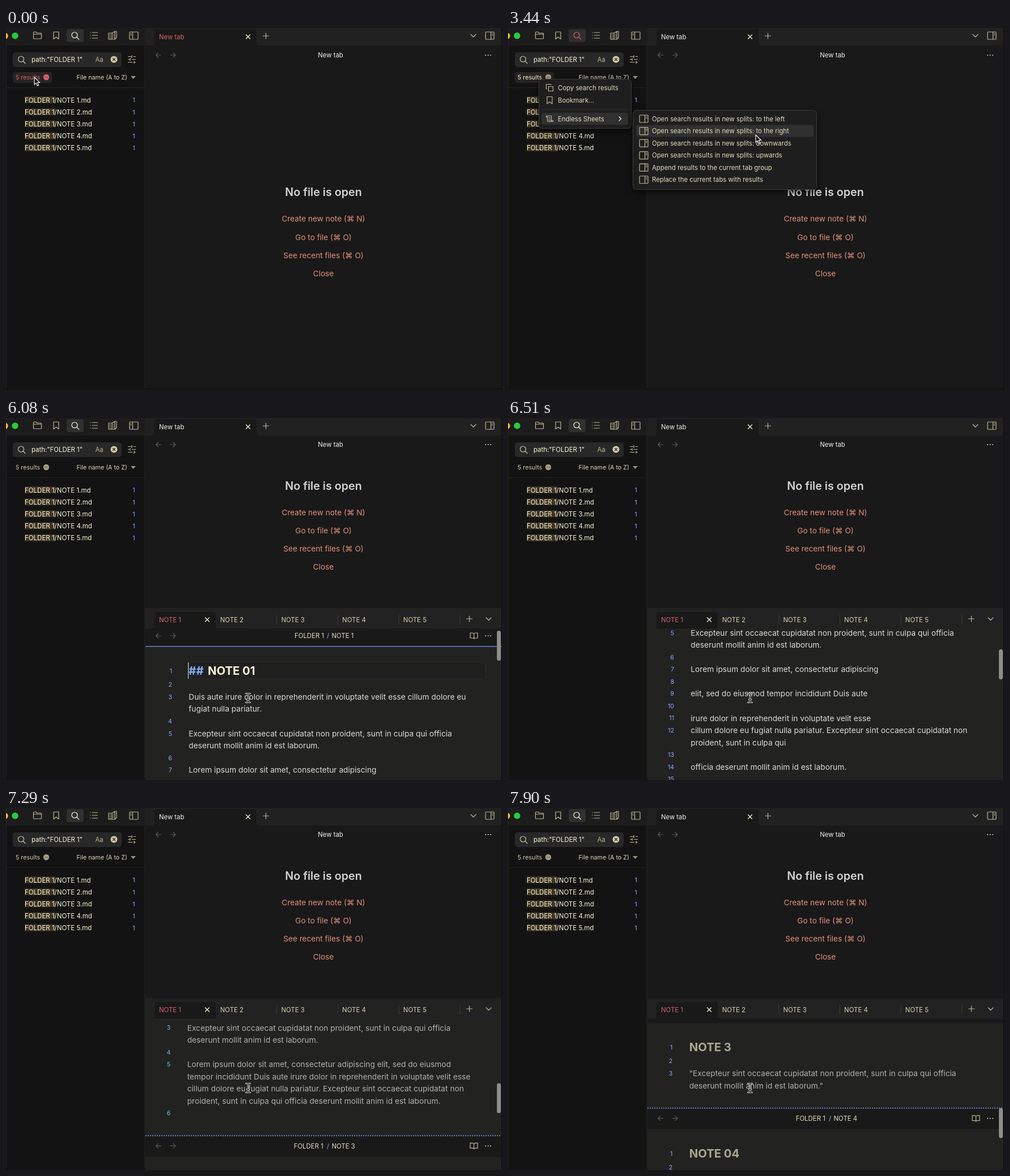
Animation, 875 px wide and 640 px high, one loop 7.99 s. Source, as an HTML page:

```html
<!DOCTYPE html>
<html lang="en">
<head>
<meta charset="utf-8">
<title>Search results in split notes</title>
<style>
  html, body { margin: 0; width: 100%; height: 100%; overflow: hidden; background: #191919; }
  svg { display: block; width: 875px; height: 640px; font-family: Inter, "Noto Sans", sans-serif; }
  text { white-space: pre; }
  .pop { filter: drop-shadow(0 4px 6px #0009); }
</style>
</head>
<body>
<svg id="stage" viewBox="0 0 875 640"></svg>
<script>
const TAN = '#bfb692', CREAM = '#fbf6d4', WHITE = '#f0f0ec', RED = '#d4606d',
      BLUE = '#86adff', LINK = '#e29078', FAINT = '#5d5a4e';
const LOOP = 7990, STEP = 86.7, ROW = 21.55;

// ---- drawing helpers: everything returns markup ----
const text = (x, cy, s, size, fill, more = '') =>
  `<text x="${x}" y="${cy + size * .36}" font-size="${size}" fill="${fill}" ${more}>${s}</text>`;
const mid = (x, cy, s, size, fill, more = '') => text(x, cy, s, size, fill, 'text-anchor="middle" ' + more);
const rect = (x, y, w, h, fill, r = 0, more = '') =>
  `<rect x="${x}" y="${y}" width="${w}" height="${h}" rx="${r}" fill="${fill}" ${more}/>`;
const icon = (x, y, d, color = TAN, more = '') =>
  `<path transform="translate(${x} ${y})" d="${d}" fill="none" stroke="${color}" stroke-width="1.2" stroke-linecap="round" stroke-linejoin="round" ${more}/>`;
const group = (id, body, more = '') => `<g id="${id}" ${more}>${body}</g>`;

const D = {
  folder: 'M-7 5V-5q0-1 1-1h3.5l2 2H6q1 0 1 1V5q0 1-1 1H-6q-1 0-1-1zM-7-2H7',
  bookmark: 'M-4.500-6H4.500V6.500L0 3-4.500 6.500z',
  search: 'M4-1A5 5 0 1 1-6-1A5 5 0 1 1 4-1M2.600 2.600L6.500 6.500',
  list: 'M-6.500-5h.5M-6.500 0h.5M-6.500 5h.5M-3-5H6.500M-3 0H6.500M-3 5H6.500',
  pages: 'M-7-4H-1V7H-7zM-1-4L4-7H7V4L4 7H-1M4-7V7M-5-1h2M-5 2h2M-5 5h2M1-2h1M1 1h1M1 4h1',
  panel: 'M-7.500-5.500q0-1 1-1h13q1 0 1 1v11q0 1-1 1h-13q-1 0-1-1zM-2-6.500v13M-5.500-3.500h1.500M-5.500-1h1.500',
  right: 'M-7.500-5.500q0-1 1-1h13q1 0 1 1v11q0 1-1 1h-13q-1 0-1-1zM2-6.500v13M4-3.500h1.500M4-1h1.500',
  sliders: 'M-6.500-5H0M3-5H6.500M0-7v4M-6.500 0H-3M0 0H6.500M-3-2v4M-6.500 5H1M4 5H6.500M4 3v4',
  cross: 'M-3.500-3.500L3.500 3.500M3.500-3.500L-3.500 3.500',
  plus: 'M-5 0H5M0-5V5',
  down: 'M-4.500-2L0 2.500 4.500-2',
  next: 'M-2-3.500L1.500 0-2 3.500',
  back: 'M4.500 0H-4.500M-.5-4L-4.500 0-.5 4',
  fwd: 'M-4.500 0H4.500M.5-4L4.500 0 .5 4',
  dots: 'M-4.500 0h.2M0 0h.2M4.500 0h.2',
  book: 'M0-3.500Q-1-5-3-5H-6.500V4H-2Q-.5 4 0 5.500Q.5 4 2 4H6.500V-5H3Q1-5 0-3.500V5',
  copy: 'M-2-2H6V6H-2zM-5 2H-6V-6H2V-5',
  scroll: 'M-4 3V-5H3V5M-6-3V-5H-4M-6-3H-4M-2 3H6V5H-3Q-4 5-4 3M-1.500-2H1M-1.500 .5H1'
};
const dots = (x, y) => icon(x, y, D.dots, TAN, 'style="stroke-width:2"');
const arrows = y => icon(269, y, D.back, FAINT) + icon(294.5, y, D.fwd, FAINT);

// ---- sidebar and window chrome ----
function sidebar() {
  let s = rect(0, 0, 245, 640, '#131313') + rect(0, 0, 875, 31, '#212121') + rect(0, 0, 245, 31, '#1c1c1c') +
    rect(244, 0, 2, 640, '#1e1e1e') + rect(0, 0, 1, 640, '#242424') +
    rect(0, 636, 875, 4, '#131313') +
    '<circle cx="-2" cy="14" r="5.7" fill="#f5bd30"/><circle cx="16" cy="13.700" r="5.700" fill="#2bc840"/>' +
    rect(107, 2, 30, 23, '#303030', 4) +
    icon(55.5, 13, D.folder) + icon(88.5, 13, D.bookmark) + icon(122, 13.5, D.search, CREAM, 'id="find"') +
    icon(155, 13, D.list) + icon(188, 13, D.pages) + icon(225.5, 13.5, D.panel) +
    rect(12, 43, 192, 26, '#282828', 5) + icon(27.5, 56, D.search, '#cfc8a8') +
    text(45, 56, 'path:"FOLDER 1"', 11.4, CREAM) + text(157.5, 56, 'Aa', 11.4, TAN) +
    '<circle cx="190.500" cy="55.500" r="6" fill="#d2c9a6"/>' +
    icon(190.5, 55.5, 'M-2-2L2 2M2-2L-2 2', '#282828') + icon(222, 55.5, D.sliders) +
    rect(12, 78, 69, 19, '#292424', 4, 'id="chip"') +
    text(17, 87.5, '5 results', 10.7, RED, 'id="count"') +
    '<circle id="badge" cx="71" cy="87" r="5.200"/>' + icon(71, 87, 'M-2.500 0h.1M0 0h.1M2.500 0h.1', '#222') +
    text(124.5, 87.5, 'File name (A to Z)', 10.7, '#e0d8b6') +
    '<path d="M220 85h9l-4.500 5z" fill="#99927a"/>' + rect(0, 105, 244, 1, '#242424');
  for (let i = 1; i <= 5; i++) {
    const y = 127 + (i - 1) * 21.2;
    s += rect(33, y - 6, 54, 12, '#3f3525') + text(33, y + .5, `FOLDER 1/NOTE ${i}.md`, 11.5, CREAM) +
      mid(225.5, y + .5, 1, 11, BLUE);
  }
  return s;
}

function topPane() {
  const lines = ['Create new note (⌘ N)', 'Go to file (⌘ O)', 'See recent files (⌘ O)', 'Close'];
  return '<path d="M258 31q4 0 4-4V6q0-4 4-4H438q4 0 4 4V27q0 4 4 4z" fill="#191919"/>' +
    text(270, 15.5, 'New tab', 11.3, RED, 'id="tabName"') + icon(427, 15.5, D.cross, CREAM) +
    icon(458.5, 14, D.plus) + icon(824.5, 13.5, D.down) + icon(853.5, 13.5, D.right) +
    group('paneHead', arrows(48) + mid(572.5, 48, 'New tab', 11.3, WHITE) + dots(850.5, 48)) +
    group('empty', mid(560, 290.3, 'No file is open', 19.7, '#d4d4d2', 'font-weight="600"') +
      lines.map((l, i) => mid(560, 337.5 + i * 32.2, l, 13.6, LINK)).join(''));
}

// ---- notes in the lower pane ----
const NOTES = [
  ['NOTE 01', [
    ['Duis aute irure dolor in reprehenderit in voluptate velit esse cillum dolore eu', 'fugiat nulla pariatur.'], [''],
    ['Excepteur sint occaecat cupidatat non proident, sunt in culpa qui officia', 'deserunt mollit anim id est laborum.'], [''],
    ['Lorem ipsum dolor sit amet, consectetur adipiscing'], [''],
    ['elit, sed do eiusmod tempor incididunt Duis aute'], [''],
    ['irure dolor in reprehenderit in voluptate velit esse'],
    ['cillum dolore eu fugiat nulla pariatur. Excepteur sint occaecat cupidatat non', 'proident, sunt in culpa qui'], [''],
    ['officia deserunt mollit anim id est laborum.'], ['']]],
  ['NOTE 2', [
    ['Excepteur sint occaecat cupidatat non proident, sunt in culpa qui officia', 'deserunt mollit anim id est laborum.'], [''],
    ['Lorem ipsum dolor sit amet, consectetur adipiscing elit, sed do eiusmod',
     'tempor incididunt Duis aute irure dolor in reprehenderit in voluptate velit esse',
     'cillum dolore eu fugiat nulla pariatur. Excepteur sint occaecat cupidatat non',
     'proident, sunt in culpa qui officia deserunt mollit anim id est laborum.'], ['']]],
  ['NOTE 3', [['"Excepteur sint occaecat cupidatat non proident, sunt in culpa qui officia', 'deserunt mollit anim id est laborum."']]],
  ['NOTE 04', [['']]]
];

function notes() {
  let top = 370, s = rect(246, 372, 628, 1200, '#222221');
  NOTES.forEach(([title, paras], n) => {
    const on = n === 0, x = on ? 322.3 : 319.7, num = (y, k) => text(x - 29.3, y, k, 10.7, BLUE, 'text-anchor="end"');
    const head = 'font-weight="700"';
    s += rect(246, top, 628, 37, '#191919') + arrows(top + 18) +
      text(x + 186.7 + (on ? 0 : 1.3), top + 18, 'FOLDER 1', 11.4, '#e6dfbc') +
      mid(568, top + 18, '/', 11.4, BLUE) + text(574.5, top + 18, 'NOTE ' + (n + 1), 11.4, '#e6dfbc') +
      icon(825.5, top + 18, D.book) + dots(850.5, top + 18);
    if (on) {
      s += rect(246, top + 36, 628, 1.6, '#5b7fc4') +
        rect(322.5, top + 64.5, 524, 30, '#202020', 0, 'stroke="#292929"') + rect(321, top + 65, 1.2, 29, '#c9c9c4') +
        text(x, top + 80, '##', 20.3, BLUE, head) + text(x + 33.7, top + 80, title, 20.3, CREAM, head);
    } else {
      s += `<path d="M246 ${top}H874" stroke="#7292d8" stroke-width="1.6" stroke-dasharray="2 2"/>` +
        text(x, top + 80, title, 20.3, '#aaa98d', head);
    }
    s += num(top + 80, 1) + num(top + 104, 2);
    let y = top + 126;
    paras.forEach((rows, i) => {
      s += num(y, i + 3);
      for (const r of rows) { s += text(x, y, r, 13.73, on ? '#dadad7' : '#b0b0ad'); y += ROW; }
    });
    top = y - ROW + 40;
  });
  return s;
}

function lowerPane() {
  let tabs = '<path d="M258 372q4 0 4-4V347q0-4 4-4H366q4 0 4 4V368q0 4 4 4z" fill="#191919"/>' +
    icon(355, 356.5, D.cross, CREAM);
  for (let i = 0; i < 5; i++) {
    tabs += text(270 + i * 107.7, 357, 'NOTE ' + (i + 1), 11.4, i ? '#d8d0ac' : RED);
    if (i) tabs += rect(369.5 + i * 107.7, 348, 1, 17, '#3c3c3a');
  }
  return rect(246, 336, 628, 36, '#222') + icon(851.5, 355, D.down) +
    group('plus', icon(0, 355, D.plus)) + group('tabs', tabs) +
    group('blank', arrows(388) + mid(560, 388, 'No file', 11.4, WHITE) + icon(825.5, 388, D.book) + dots(850.5, 388)) +
    group('editor', group('doc', notes()), 'clip-path="url(#view)"') +
    rect(866, 0, 7, 53, '#8d8d8b', 3.5, 'id="thumb"');
}

// ---- menus ----
const MENU_Y = [105.5, 127.5, 160.5];
const ways = ['to the left', 'to the right', 'downwards', 'upwards'].map(w => 'Open search results in new splits: ' + w);
const SUB = [...ways, 'Append results to the current tab group', 'Replace the current tabs with results'];

function menus() {
  const box = (x, y, w, h) => rect(x, y, w, h, '#1e1e1e', 6, 'stroke="#3a3a3a" class="pop"');
  const labels = [['copy', 'Copy search results'], ['bookmark', 'Bookmark...'], ['scroll', 'Endless Sheets']];
  return group('menu', box(54.5, 90.5, 163, 87) + rect(55, 143.5, 162, 1, '#2f2f2f') +
      rect(59, 0, 153, 21, '#303030', 4, 'id="hot"') +
      labels.map(([k, l], i) => icon(73.5, MENU_Y[i], D[k]) + text(88, MENU_Y[i], l, 11.35, '#e2dcbc')).join('') +
      icon(198, 160.5, D.next, CREAM)) +
    group('sub', box(220.5, 145.5, 324, 140) + rect(226, 0, 313, 21, '#303030', 4, 'id="subHot"') +
      SUB.map((l, i) => icon(239.5, 160.5 + i * ROW, D.right) + text(254, 160.5 + i * ROW, l, 11.35, '#e2dcbc')).join(''));
}

const arrow = '<path d="M0 0V13L3 10.300 5.300 15.300 7.600 14.300 5.400 9.500H9.500z" fill="#111" stroke="#fff" stroke-width="1.100"/>';
const beamPath = 'M-3.500-8Q0-8 0-5.500Q0-8 3.500-8M0-5.500V5.500M-3.500 8Q0 8 0 5.500Q0 8 3.500 8M-2 2.500H2';
const beam = icon(0, 0, beamPath, '#fff', 'style="stroke-width:2.6"') + icon(0, 0, beamPath, '#111');

document.getElementById('stage').innerHTML =
  '<clipPath id="view"><rect x="246" y="372" width="628" height="268"/></clipPath>' +
  rect(0, 0, 875, 640, '#191919') + sidebar() + topPane() + group('lower', lowerPane()) + rect(874, 0, 1, 640, '#0c0c0c') +
  menus() + group('arrow', arrow) + group('beam', beam);

// ---- motion ----
const PATH = [[0, 50, 87], [1423, 50, 87], [1600, 72, 107], [1770, 116, 141], [1943, 141, 161],
  [2573, 141, 161], [2830, 214, 166], [3200, 375, 182], [3440, 437, 189], [3530, 450, 188],
  [3790, 230, 162], [4050, 301, 196], [4134, 301, 196], [4220, 303, 200],
  [5373, 303, 200], [5550, 338, 280], [5720, 402, 430], [5890, 427, 495]];
const SCROLL = [[5993, 0], [6080, 3], [6260, 62], [6510, 179], [7290, 595.2], [7900, 833]];
const BURSTS = [1510, 2660, 5460, 6080];

function at(keys, t) {
  const i = keys.findIndex(k => k[0] > t);
  if (i === 0) return keys[0].slice(1);
  if (i < 0) return keys[keys.length - 1].slice(1);
  const a = keys[i - 1], b = keys[i], p = (t - a[0]) / (b[0] - a[0]);
  return a.slice(1).map((v, j) => v + (b[j + 1] - v) * p);
}

function tick(t) {
  const start = BURSTS.filter(b => b <= t).pop();
  return start ? start + Math.floor((t - start + 4) / STEP) * STEP : 0;
}

const $ = id => document.getElementById(id);
const show = (id, on) => $(id).setAttribute('display', on ? 'inline' : 'none');
const move = (id, x, y) => $(id).setAttribute('transform', `translate(${x} ${y})`);
const paint = (id, kind, color) => $(id).setAttribute(kind, color);

function draw(t) {
  const menu = t >= 980 && t < 4850, sub = menu && t >= 2210, split = t >= 4850, doc = t >= 5030;
  const now = tick(t), [x, y] = at(PATH, now), [scroll] = at(SCROLL, now);

  paint('find', 'stroke', menu ? RED : CREAM);
  paint('tabName', 'fill', t < 980 ? RED : WHITE);
  paint('count', 'fill', t < 980 ? RED : menu ? CREAM : '#d2caa8');
  paint('badge', 'fill', t < 980 ? RED : '#a59d80');
  show('chip', !split);

  move('paneHead', 0, split ? -1 : 0);
  move('empty', 0, split ? -170.7 : 0);
  show('lower', split);
  show('tabs', t >= 4940);
  move('plus', t >= 4940 ? 817.5 : 727.5, 0);
  show('blank', !doc);
  show('editor', doc);
  move('doc', 0, -scroll);
  show('thumb', t >= 6080);
  move('thumb', 0, 376 + (scroll - 3) * .186);

  const hot = sub ? 2 : x > 58 ? MENU_Y.findIndex(m => Math.abs(y - m) < 11) : -1;
  show('menu', menu);
  show('hot', menu && hot >= 0);
  if (hot >= 0) $('hot').setAttribute('y', MENU_Y[hot] - 10.5);
  show('sub', sub);
  show('subHot', sub && x > 221);
  $('subHot').setAttribute('y', 150 + Math.floor((y - 149.5) / ROW) * ROW);

  const typing = y > 372;
  show('arrow', !typing);
  show('beam', typing);
  move(typing ? 'beam' : 'arrow', x, y);
}

const begin = performance.now();
function frame() {
  draw((performance.now() - begin) % LOOP);
  requestAnimationFrame(frame);
}
frame();
</script>
</body>
</html>
```
